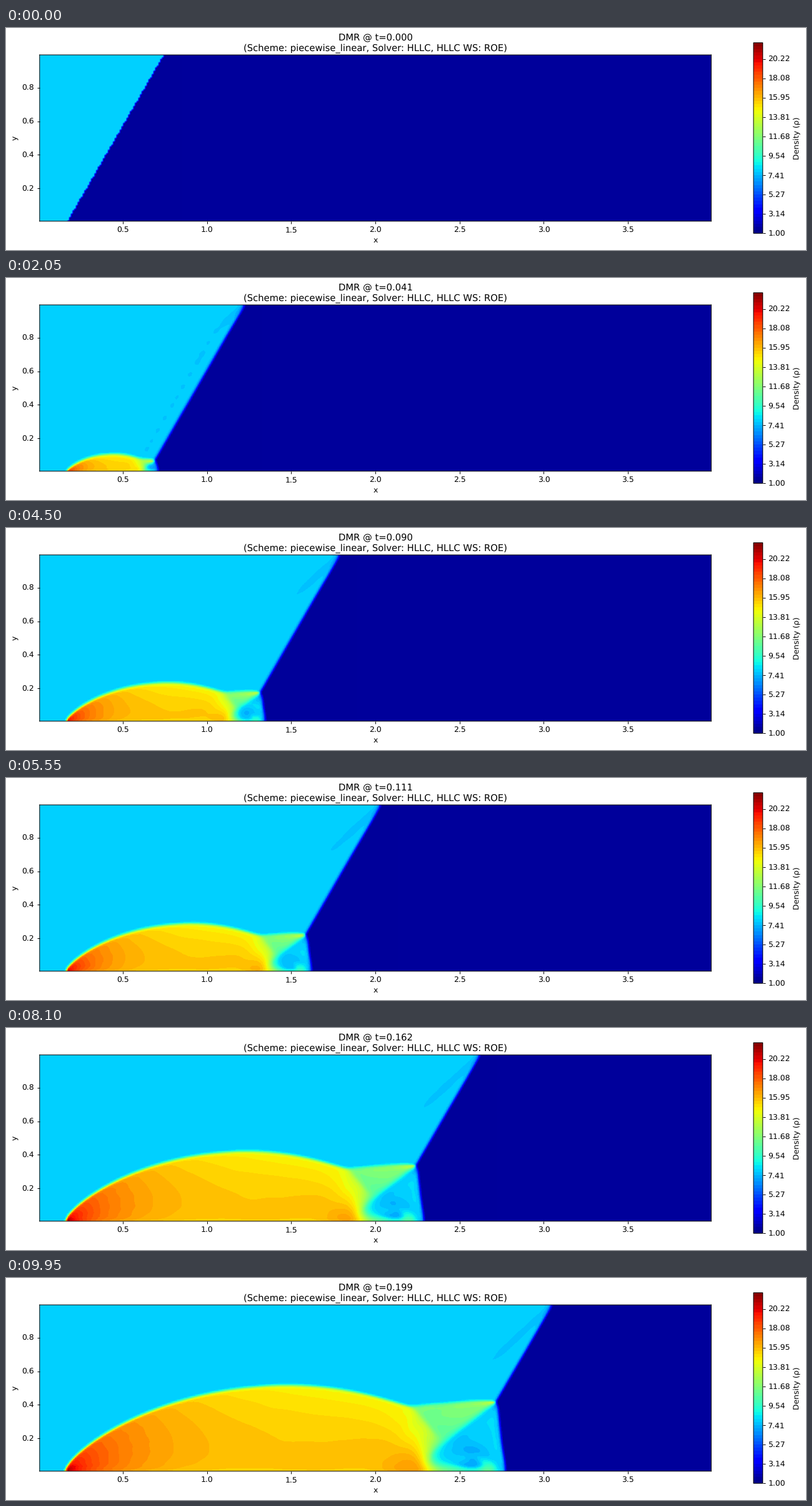
Write a matplotlib script that moves like this. It is 1280 by 356 pixels and loops after 10 s.

```python
"""Double Mach reflection: 2D Euler equations, MUSCL-Hancock with HLLC fluxes."""
import numpy as np
import matplotlib.pyplot as plt
from matplotlib.animation import FuncAnimation
from matplotlib.cm import ScalarMappable
from matplotlib.colors import ListedColormap, Normalize

WIDTH, HEIGHT, DPI = 1280, 356, 80
FRAMES, INTERVAL = 200, 50
FRAME_DT, SUBSTEPS = 0.001, 4

GAMMA = 1.4
NY = 100
NX = 4 * NY
DX = 1 / NY
FOOT = 1 / 6
TINY = 1e-4

X = (np.arange(NX + 4) - 1.5) * DX
Y = (np.arange(NY + 4) - 1.5) * DX


def to_conserved(rho, u, v, p):
    energy = p / (GAMMA - 1) + 0.5 * rho * (u * u + v * v)
    return np.array([rho, rho * u, rho * v, energy], dtype=np.float32)


def to_primitive(state):
    rho, mx, my, energy = state
    u, v = mx / rho, my / rho
    p = (GAMMA - 1) * (energy - 0.5 * (mx * u + my * v))
    return np.stack([rho, u, v, p])


ANGLE = np.pi / 6
POST = to_conserved(8.0, 8.25 * np.cos(ANGLE), -8.25 * np.sin(ANGLE), 116.5)[:, None, None]
PRE = to_conserved(1.4, 0.0, 0.0, 1.0)[:, None, None]
MIRROR = np.array([1, 1, -1, 1], dtype=np.float32)[:, None, None]


def shock_x(y, t):
    return FOOT + (y + 20 * t) / np.sqrt(3)


def active_columns(t):
    """Columns up to just ahead of the incident shock; the rest is still gas."""
    return min(NX, int((shock_x(1, t) + 0.1) / DX))


def fill_ghosts(state, x, t):
    state[:, :, :2] = POST
    state[:, :2] = np.where(x >= FOOT, state[:, 3:1:-1] * MIRROR, POST)
    state[:, -2:] = np.where(x < shock_x(1, t), POST, PRE)


def minmod_slopes(w, axis):
    d = np.diff(w, axis=axis)
    a, b = (d[:, :-1], d[:, 1:]) if axis == 1 else (d[:, :, :-1], d[:, :, 1:])
    low, high = np.minimum(a, b), np.maximum(a, b)
    return np.maximum(low, 0) + np.minimum(high, 0)


def hllc(left, right, n, s):
    """HLLC flux with Roe wave speeds; n and s index normal and tangential velocity."""
    def unpack(w):
        rho, p = np.maximum(w[0], TINY), np.maximum(w[3], TINY)
        u, v = w[n], w[s]
        energy = p / (GAMMA - 1) + 0.5 * rho * (u * u + v * v)
        return rho, u, v, p, energy

    rl, ul, vl, pl, el = unpack(left)
    rr, ur, vr, pr, er = unpack(right)

    weight = np.sqrt(rl)
    weight = weight / (weight + np.sqrt(rr))
    hl, hr = (el + pl) / rl, (er + pr) / rr
    u = ur + weight * (ul - ur)
    v = vr + weight * (vl - vr)
    h = hr + weight * (hl - hr)
    c = np.sqrt(np.maximum((GAMMA - 1) * (h - 0.5 * (u * u + v * v)), TINY))

    sl = np.minimum(ul - np.sqrt(GAMMA * pl / rl), u - c)
    sr = np.maximum(ur + np.sqrt(GAMMA * pr / rr), u + c)
    ml, mr = rl * (sl - ul), rr * (sr - ur)
    mid = (pr - pl + ml * ul - mr * ur) / (ml - mr)

    upwind = mid >= 0
    rho, u, v, p, e = (np.where(upwind, a, b) for a, b in
                       ((rl, rr), (ul, ur), (vl, vr), (pl, pr), (el, er)))
    speed = np.where(upwind, np.minimum(sl, 0), np.maximum(sr, 0))
    m = rho * (speed - u)
    star = m / (speed - mid)

    flux = np.empty(left.shape, dtype=np.float32)
    flux[0] = rho * u + speed * (star - rho)
    flux[n] = rho * u * u + p + speed * (star * mid - rho * u)
    flux[s] = v * flux[0]
    flux[3] = u * (e + p) + speed * (star * (e / rho + (mid - u) * (mid + p / m)) - e)
    return flux


def advance(state, x, t, dt):
    fill_ghosts(state, x, t)
    w = to_primitive(state)
    dx = minmod_slopes(w[:, 1:-1], 2)
    dy = minmod_slopes(w[:, :, 1:-1], 1)
    w = w[:, 1:-1, 1:-1]
    rho, u, v, p = w

    # Half-step predictor in primitive variables
    rate = u * dx + v * dy
    div = dx[1] + dy[2]
    rate[0] += rho * div
    rate[1] += dx[3] / rho
    rate[2] += dy[3] / rho
    rate[3] += GAMMA * p * div
    w = w - (0.5 * dt / DX) * rate

    dx *= 0.5
    dy *= 0.5
    fx = hllc((w + dx)[:, 1:-1, :-1], (w - dx)[:, 1:-1, 1:], 1, 2)
    fy = hllc((w + dy)[:, :-1, 1:-1], (w - dy)[:, 1:, 1:-1], 2, 1)
    state[:, 2:-2, 2:-2] -= (dt / DX) * (np.diff(fx, axis=2) + np.diff(fy, axis=1))


def simulate():
    state = np.where(X < shock_x(Y[:, None], 0), POST, PRE)
    dt = FRAME_DT / SUBSTEPS
    densities = []
    for frame in range(FRAMES):
        t = frame * FRAME_DT
        columns = active_columns(t + FRAME_DT)
        densities.append(state[0, 2:-2, 2:columns + 2].copy())
        if frame < FRAMES - 1:
            window = state[:, :, :columns + 4]
            for k in range(SUBSTEPS):
                advance(window, X[:columns + 4], t + k * dt, dt)
    return densities


def pixel_box(left, top, right, bottom):
    return [left / WIDTH, 1 - bottom / HEIGHT,
            (right - left) / WIDTH, (bottom - top) / HEIGHT]


def title_at(t):
    return (f"DMR @ t={t:.3f}\n"
            "(Scheme: piecewise_linear, Solver: HLLC, HLLC WS: ROE)")


SCALE = 10 / 9
plt.rcParams.update({
    "font.family": "DejaVu Sans",
    "font.size": 10 * SCALE,
    "text.hinting": "none",
    "axes.linewidth": 0.8 * SCALE,
    "axes.labelpad": 4 * SCALE,
    "axes.titlepad": 5.7 * SCALE,
})
for axis_name in ("xtick", "ytick"):
    plt.rcParams.update({
        f"{axis_name}.major.size": 3.5 * SCALE,
        f"{axis_name}.major.width": 0.8 * SCALE,
        f"{axis_name}.major.pad": 3.5 * SCALE,
    })

LEVELS = np.linspace(1, 22, 60)
BANDS = len(LEVELS) - 1
norm = Normalize(LEVELS[0], LEVELS[-1])
cmap = ListedColormap(plt.get_cmap("jet")((np.arange(BANDS) + 0.5) / BANDS))

densities = simulate()

fig = plt.figure(figsize=(WIDTH / DPI, HEIGHT / DPI), dpi=DPI, facecolor="white")
ax = fig.add_axes(pixel_box(53.8, 43.1, 1128.4, 309.8), facecolor=cmap(norm(1.4)))
image = ax.imshow(densities[0], cmap=cmap, norm=norm, origin="lower", aspect="auto",
                  interpolation="bilinear", interpolation_stage="data")
ax.set_xlim(DX / 2, 4 - DX / 2)
ax.set_ylim(DX / 2, 1 - DX / 2)
ax.set_xticks(np.arange(0.5, 4, 0.5))
ax.set_yticks([0.2, 0.4, 0.6, 0.8])
ax.set_xlabel("x")
ax.set_ylabel("y")
title = ax.set_title(title_at(0))

cax = fig.add_axes(pixel_box(1196, 23.6, 1210.8, 329.3))
bar = fig.colorbar(ScalarMappable(norm, cmap), cax=cax, ticks=LEVELS[::6], format="%.2f")
bar.set_label("Density (ρ)")

# Borders sit between whole pixels
for border in (*ax.spines.values(), bar.outline):
    border.set_snap(False)


def draw(frame):
    density = densities[frame]
    image.set_data(density)
    image.set_extent((0, density.shape[1] * DX, 0, 1))
    title.set_text(title_at(frame * FRAME_DT))
    return image, title


animation = FuncAnimation(fig, draw, frames=FRAMES, interval=INTERVAL,
                          repeat=True, repeat_delay=0, blit=False)
plt.show()
```
